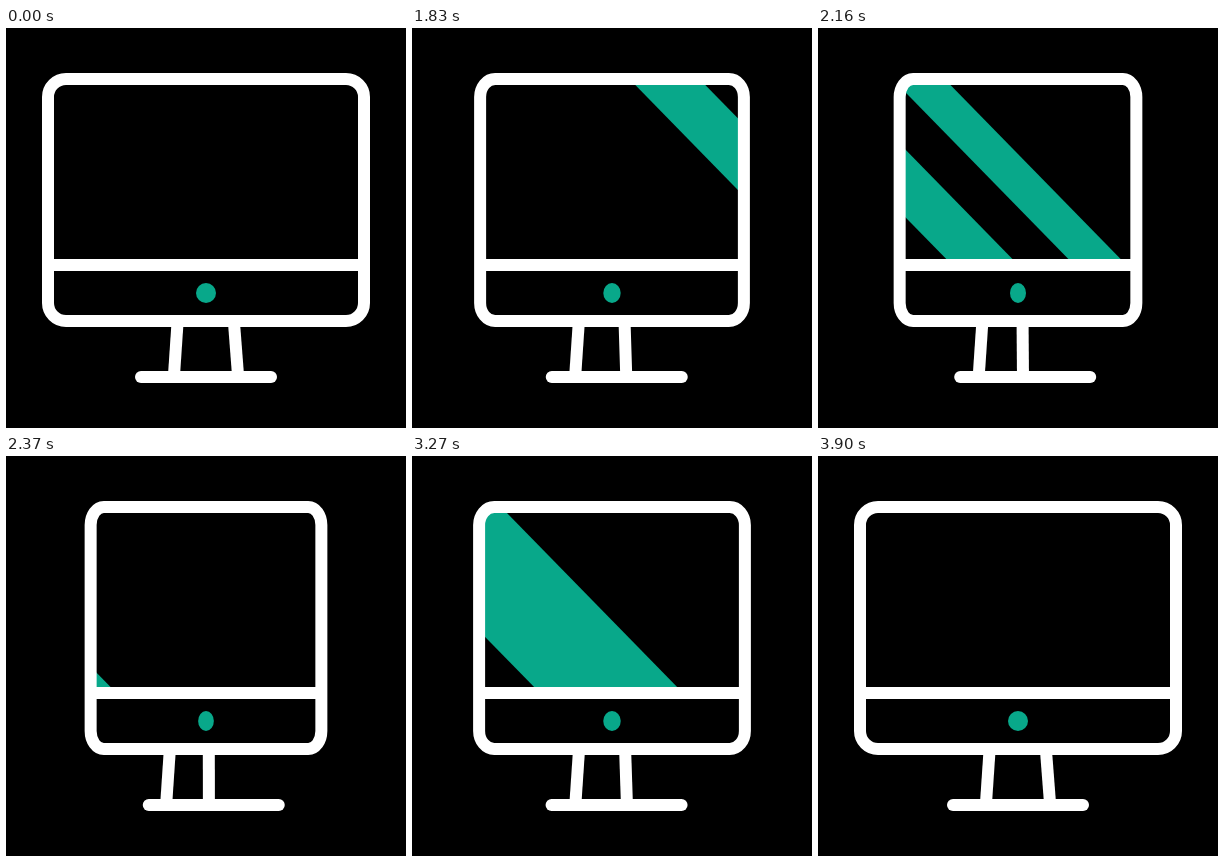
Write an HTML page with a canvas that moves like this. It is 400 by 400 pixels and loops after 3.93 s.

```html
<!DOCTYPE html>
<html lang="en">
<head>
<meta charset="utf-8">
<title>Turning monitor</title>
<style>
  html, body { margin: 0; height: 100%; overflow: hidden; background: #000; }
  canvas { display: block; width: 400px; height: 400px; }
</style>
</head>
<body>
<canvas id="stage" width="400" height="400"></canvas>
<script>
const ctx = document.getElementById('stage').getContext('2d');
const LOOP = 3930, STEP = 30;
const GREEN = '#08a88a', WHITE = '#fff';
const SCREEN_TOP = 51, DIVIDER = 237, BOTTOM = 293, SLOPE = 0.978;

const lerp = (a, b, k) => a + (b - a) * k;
const progress = (t, start, end) => Math.min(1, Math.max(0, (t - start) / (end - start)));
const smooth = s => s * s * (3 - 2 * s);

// Cubic bezier easing with flat ends: (x1, 0, x2, 1)
function ease(u, x1, x2) {
  let low = 0, high = 1;
  for (let i = 0; i < 30; i++) {
    const s = (low + high) / 2;
    const x = 3 * x1 * s * (1 - s) ** 2 + 3 * x2 * s * s * (1 - s) + s ** 3;
    if (x < u) low = s; else high = s;
  }
  return smooth(low);
}

// Reflections sweep across the glass; from and to are centres at y = 57
const bands = [
  { start: 1500, end: 2500, from: 401, to: -159, width: [72, 64] },
  { start: 1777, end: 2527, from: 386, to: -156, width: [44, 60] },
  { start: 2900, end: 3900, from: -156, to: 424, width: [143, 143] },
];

function line(x1, y1, x2, y2, cap = 'butt') {
  ctx.lineCap = cap;
  ctx.beginPath();
  ctx.moveTo(x1, y1);
  ctx.lineTo(x2, y2);
  ctx.stroke();
}

function drawBand(t, { start, end, from, to, width }) {
  const u = progress(t, start, end);
  if (u === 0 || u === 1) return;
  const k = smooth(u);
  const centre = lerp(from, to, k), half = lerp(...width, k) / 2;
  const xAt = y => centre + (y - 57) * SLOPE;
  ctx.beginPath();
  ctx.moveTo(xAt(SCREEN_TOP) - half, SCREEN_TOP);
  ctx.lineTo(xAt(SCREEN_TOP) + half, SCREEN_TOP);
  ctx.lineTo(xAt(DIVIDER) + half, DIVIDER);
  ctx.lineTo(xAt(DIVIDER) - half, DIVIDER);
  ctx.fill();
}

function draw(t) {
  const turn = t < 2700
    ? ease(progress(t, 1500, 2700), 0.3, 0)
    : 1 - ease(progress(t, 2700, 3900), 0.65, 0.35);
  const half = lerp(158, 114, turn), left = 200 - half, right = 200 + half;

  ctx.fillStyle = '#000';
  ctx.fillRect(0, 0, 400, 400);
  ctx.fillStyle = GREEN;
  ctx.strokeStyle = WHITE;
  ctx.lineWidth = 12;

  const frame = new Path2D();
  frame.roundRect(left, SCREEN_TOP, 2 * half, BOTTOM - SCREEN_TOP, { x: 18 * half / 158, y: 18 });

  ctx.save();
  ctx.clip(frame);
  bands.forEach(band => drawBand(t, band));
  ctx.restore();

  ctx.beginPath();
  ctx.ellipse(200, 265, lerp(10, 7.8, turn), 10, 0, 0, 2 * Math.PI);
  ctx.fill();

  line(171.5 - 8 * turn, 295, 168 - 8 * turn, 347);
  line(228 - 26 * turn, 295, 232 - 30 * turn, 347);
  line(135 + 8 * turn, 349, 265 + 8 * turn, 349, 'round');
  line(left, DIVIDER, right, DIVIDER);
  ctx.stroke(frame);
}

const begin = performance.now();
function tick() {
  const t = (performance.now() - begin) % LOOP;
  draw(Math.floor(t / STEP) * STEP);
  requestAnimationFrame(tick);
}
tick();
</script>
</body>
</html>
```
